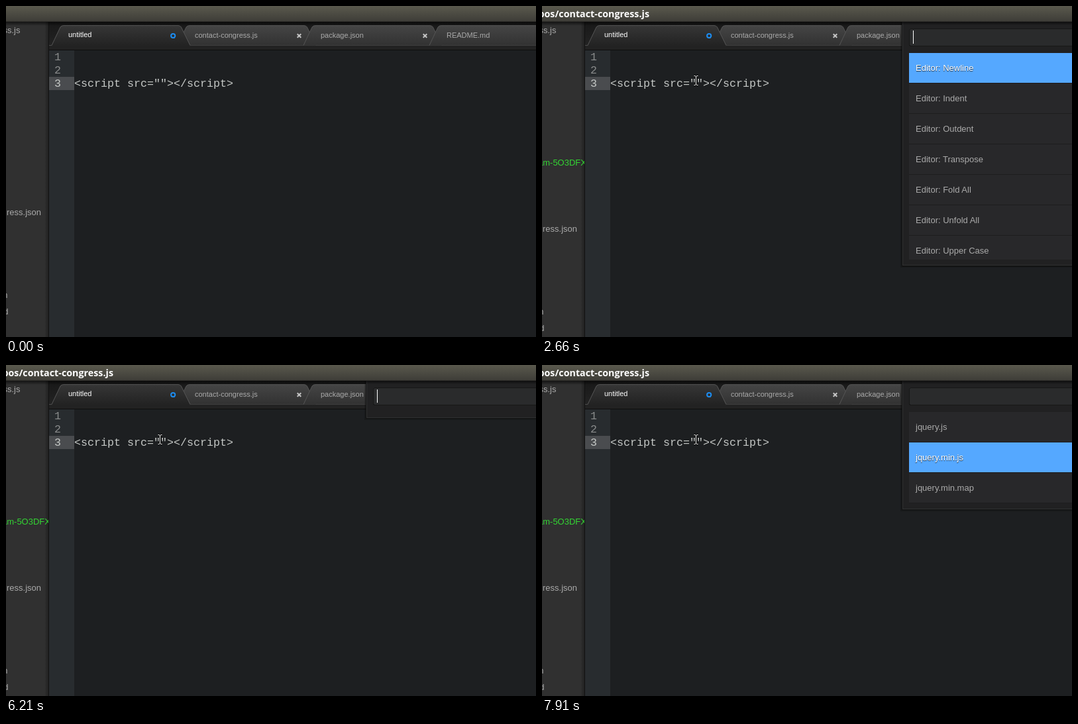
These frames come from a looping animation (800x500 px, 8000 ms). An HTML page:

```html
<!DOCTYPE html>
<html lang="en">
<head>
<meta charset="utf-8">
<title>Editor command palette</title>
<style>
html, body { margin: 0; width: 100%; height: 100%; overflow: hidden; background: #1d1f21; }
svg { display: block; }
text { font: 13px "Liberation Sans", Arial, sans-serif; fill: #aaa; white-space: pre; }
rect { shape-rendering: crispEdges; }
.end { text-anchor: end; }
.tab { font-size: 11px; }
.mono { font: 16.66px "Liberation Mono", "Courier New", monospace; fill: #c5c8c6; }
.num { fill: #8a8c8c; }
.title { font: bold 14.3px "Open Sans", "Noto Sans", sans-serif; fill: #fff; text-anchor: end; }
.on { fill: #fff; text-shadow: 0 1px 1px rgba(0, 0, 0, .75); }
</style>
</head>
<body>
<svg width="800" height="500" viewBox="0 0 800 500">
  <defs>
    <linearGradient id="bar" x2="0" y2="1"><stop stop-color="#5a594d"/><stop offset="1" stop-color="#3d3c37"/></linearGradient>
    <linearGradient id="idle" x2="0" y2="1"><stop stop-color="#454545"/><stop offset="1" stop-color="#323232"/></linearGradient>
    <linearGradient id="active" x2="0" y2="1"><stop stop-color="#363636"/><stop offset="1" stop-color="#222"/></linearGradient>
    <linearGradient id="strip" x2="0" y2="1"><stop stop-color="#181818"/><stop offset="1" stop-color="#232323"/></linearGradient>
    <linearGradient id="shade" x2="0" y2="1"><stop stop-color="#000" stop-opacity=".6"/><stop offset="1" stop-color="#000" stop-opacity="0"/></linearGradient>
    <linearGradient id="side"><stop stop-color="#000" stop-opacity="0"/><stop offset="1" stop-color="#000" stop-opacity=".3"/></linearGradient>
    <clipPath id="tree"><rect y="24" width="64" height="476"/></clipPath>
    <clipPath id="view"><rect x="554" y="71" width="246" height="312"/></clipPath>
  </defs>

  <rect width="800" height="500" fill="#1d1f21"/>
  <rect x="65" y="67" width="38" height="433" fill="#282c2f"/>
  <rect x="65" y="107" width="38" height="20" fill="#4a4c4f"/>
  <text class="mono num" x="73" y="82">1</text>
  <text class="mono num" x="73" y="102">2</text>
  <text class="mono" x="73" y="122">3</text>
  <text class="mono" x="103" y="122">&lt;script src=""&gt;&lt;/script&gt;</text>
  <rect id="codeCaret" x="233" y="107" width="1" height="20" fill="#bbb"/>

  <rect y="24" width="64" height="476" fill="#303030"/>
  <rect x="58" y="24" width="6" height="476" fill="url(#side)"/>
  <g clip-path="url(#tree)">
    <text class="end" x="21.5" y="41">contact-congress.js</text>
    <text id="added" x="-6" y="241" style="fill:#33d633">am-5O3DFX</text>
    <g id="lower">
      <text class="end" x="53" y="316">contact-congress.json</text>
      <text class="end" x="2.5" y="441">package.json</text>
      <text class="end" x="3.5" y="466">README.md</text>
    </g>
  </g>
  <rect x="64" y="24" width="1" height="476" fill="#111"/>

  <rect x="65" y="24" width="735" height="36" fill="url(#strip)"/>
  <rect x="65" y="60" width="735" height="6" fill="#222"/>
  <rect x="65" y="59" width="735" height="1" fill="#4c4c4c"/>
  <rect x="65" y="66" width="735" height="1" fill="#0e0e0e"/>
  <g id="tabs"></g>
  <circle cx="252.2" cy="45" r="3.1" fill="none" stroke="#1c8df2" stroke-width="2"/>
  <rect y="24" width="800" height="6" fill="url(#shade)"/>

  <g id="panel">
    <rect id="glow" x="541" y="24" width="259" fill="#000" opacity=".2"/>
    <rect id="frame" x="543" y="24" width="257" fill="#131313"/>
    <rect id="edge" x="544" y="24" width="256" fill="#303132"/>
    <rect id="body" x="545" y="24" width="255" fill="#212122"/>
    <rect x="554.5" y="34.5" width="260" height="26" rx="3" fill="#2a2b2c" stroke="#171717"/>
    <text class="mono" id="query" x="560" y="51.5" style="fill:#fff"></text>
    <rect id="caret" y="37" width="1" height="20" fill="#fff"/>
    <g id="rows" clip-path="url(#view)"></g>
    <rect x="543" y="24" width="257" height="5" fill="url(#shade)"/>
  </g>

  <rect width="800" height="24" fill="url(#bar)"/>
  <rect y="23" width="800" height="1" fill="#2b2a27"/>
  <text class="title" id="title" x="162" y="17">repos/contact-congress.js</text>

  <g id="mouse" fill="none">
    <path id="beam" d="M-2.5-6.5H-1L.5-5.5L2-6.5H3.5M.5-5.5V6.5M-2.5 7.5H-1L.5 6.5L2 7.5H3.5" stroke="#000" stroke-width="2.6"/>
    <use href="#beam" style="display:none"/>
    <path d="M-2.5-6.5H-1L.5-5.5L2-6.5H3.5M.5-5.5V6.5M-2.5 7.5H-1L.5 6.5L2 7.5H3.5" stroke="#fff"/>
  </g>
</svg>
<script>
const LOOP = 8000;
const $ = id => document.getElementById(id);
const show = (id, on) => $(id).style.display = on ? "" : "none";

function tab(x, name, active) {
  const slope = `M${x} 59.5L${x + 13} 32Q${x + 14.5} 29.5 ${x + 18} 29.5H${x + 191}Q${x + 194} 29.5 ${x + 195.5} 32L${x + 209} 59.5`;
  const cross = active ? "" :
    `<path d="M${x + 180.7} 42.2l5.6 5.6m0-5.6l-5.6 5.6" stroke="#c4c4c4" stroke-width="2"/>`;
  return `<path d="${slope}${active ? "V61H" + x + "Z" : ""}" fill="url(#${active ? "active" : "idle"})"/>
    <path d="${slope}" fill="none" stroke="#555"/>${cross}
    <text class="tab" x="${x + (active ? 25 : 26)}" y="${active ? 47 : 48}"${active ? ' style="fill:#fff"' : ""}>${name}</text>`;
}
$("tabs").innerHTML = ["contact-congress.js", "package.json", "README.md"]
  .map((name, i) => tab(259 + 190 * i, name)).join("") + tab(69, "untitled", true);

const lists = {
  none: "",
  all: "Editor: Newline|Editor: Indent|Editor: Outdent|Editor: Transpose|Editor: Fold All|Editor: Unfold All|Editor: Upper Case",
  cdnjs: "Cdnjs: GetUrl|Cdnjs: Convert|Cdnjs: GetLinkTag|Cdnjs: DownloadFile|Cdnjs: GetScriptTag",
  libs: "backbone.js|angular.js|underscore.js|mootools|prototype|dojo|yui",
  j: "jo|jade|jspdf|joopl|jssip|jszip|json5",
  jq: "jquery|jqPlot|jqtree|jqModal|jqueryui|jquery-te|jquery-layout",
  versions: "2.1.1-rc2|2.1.1-rc1|2.1.1-beta1|2.1.1|2.1.0-rc1|2.1.0-beta3|2.1.0-beta2",
  files: "jquery.js|jquery.min.js|jquery.min.map"
};

// time, query, caret shown, list, selected row
const steps = [
  [2580, "", 1, "none", 0], [2660, "", 1, "all", 0],
  [2870, "c", 1, "all", 0], [2920, "cd", 1, "all", 0], [2970, "cdn", 1, "all", 0],
  [3030, "cdnj", 1, "all", 0], [3080, "cdnjs", 1, "all", 0], [3130, "cdnjs", 1, "cdnjs", 0],
  [3350, "cdnjs", 0, "cdnjs", 0],
  [4220, "", 1, "libs", 0], [4580, "", 0, "libs", 0], [4810, "j", 1, "libs", 0],
  [5370, "j", 1, "j", 0], [5420, "jq", 1, "j", 0], [5660, "jq", 1, "jq", 0], [5780, "jq", 0, "jq", 0],
  [6100, "", 0, "none", 0], [6210, "", 1, "none", 0], [6560, "", 0, "none", 0],
  [6650, "", 1, "versions", 0], [6920, "", 1, "versions", 1], [6980, "", 1, "versions", 2],
  [7080, "", 0, "versions", 2], [7230, "", 0, "versions", 3],
  [7320, "", 0, "none", 0], [7410, "", 1, "files", 0], [7720, "", 0, "files", 0], [7910, "", 0, "files", 1]
];

function row(name, i, selected) {
  const y = 71 + 46 * i;
  return `<rect x="554" y="${y}" width="246" height="46" fill="#1d1d1e"/>
    <rect x="554" y="${y}" width="246" height="45" fill="${selected ? "#55a8ff" : "#28282a"}"/>
    <text x="564" y="${y + 27}"${selected ? ' class="on"' : ""}>${name}</text>`;
}

let last;
function drawPanel(step) {
  if (step === last) return;
  last = step;
  show("panel", step);
  if (!step) return;
  const [, query, caret, list, picked] = step;
  const names = lists[list].split("|").filter(Boolean);
  const height = Math.min(46 * names.length, 312) + 58;
  $("glow").setAttribute("height", height + 1);
  $("frame").setAttribute("height", height - (names.length < 7 ? 1 : 0));
  $("edge").setAttribute("height", height - 2);
  $("body").setAttribute("height", height - 3);
  $("query").textContent = query;
  $("caret").setAttribute("x", 560 + 10 * query.length);
  show("caret", caret);
  $("rows").innerHTML = names.map((name, i) => row(name, i, i === picked)).join("");
}

function draw(t) {
  show("added", t >= 50);
  $("lower").setAttribute("transform", `translate(0 ${t >= 50 ? 25 : 0})`);
  show("title", t >= 1110);
  show("mouse", t >= 1110);
  const p = Math.max(0, Math.min(1, Math.floor((t - 1110) / 68.5) / 7));
  const rest = (1 - p) ** 2;
  $("mouse").setAttribute("transform", `translate(${Math.round(232 + 562 * rest)} ${Math.round(112 + 121 * rest)})`);
  show("codeCaret", t >= 1750 && t < 1940);
  drawPanel(steps.filter(s => s[0] <= t).pop() || null);
}

const start = performance.now();
function tick() {
  draw((performance.now() - start) % LOOP);
  requestAnimationFrame(tick);
}
tick();
</script>
</body>
</html>
```
